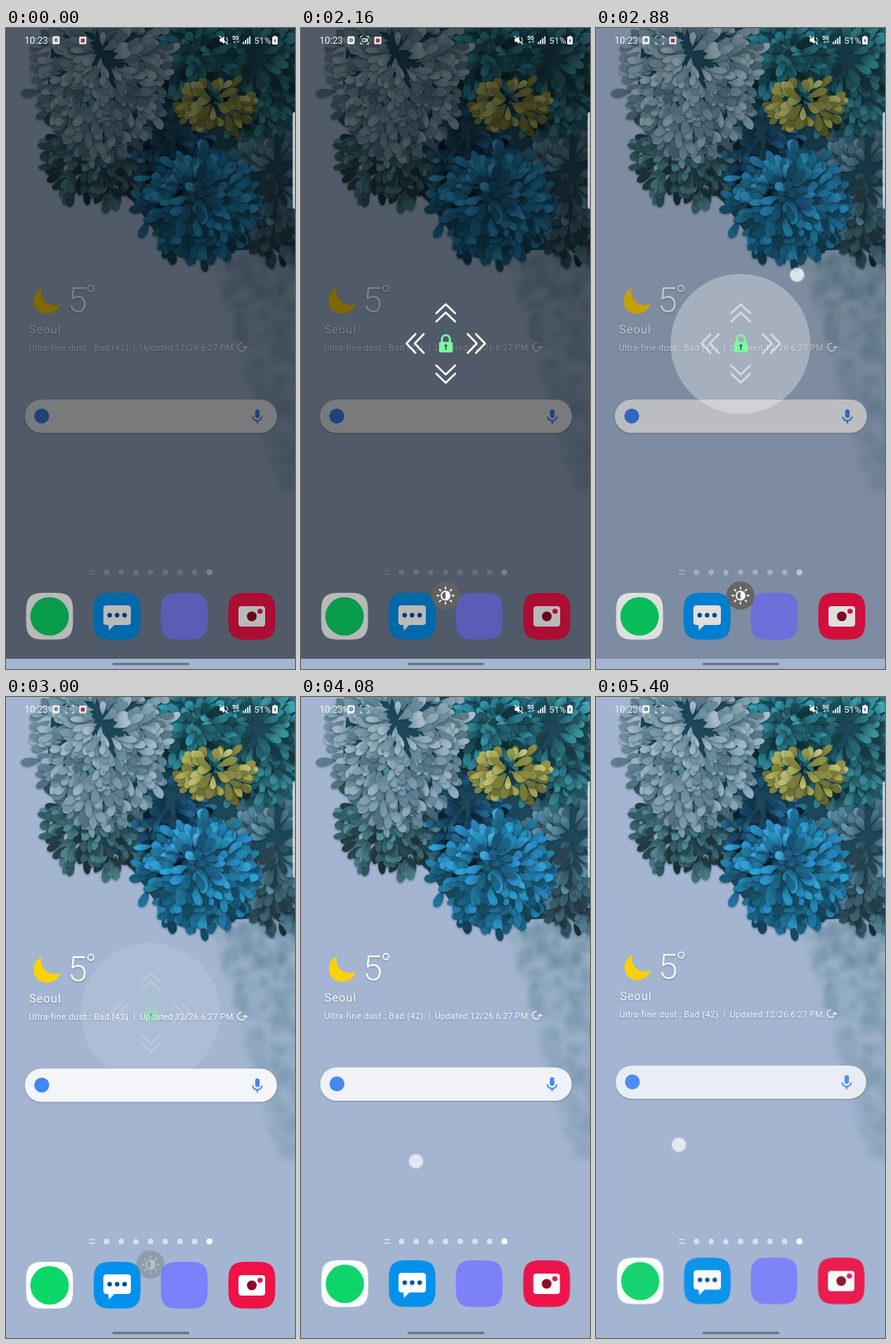
An HTML page with a canvas for the animation above (5520 ms loop, 368x816 px).

```html
<!DOCTYPE html>
<html lang="en">
<head>
<meta charset="utf-8">
<title>Screen dim and unlock</title>
<style>
html, body { margin: 0; width: 100%; height: 100%; overflow: hidden; background: #a3b5d1; }
canvas { display: block; width: 368px; height: 816px; }
</style>
</head>
<body>
<canvas id="stage" width="368" height="816"></canvas>
<script>
const W = 368, H = 816, LOOP = 5520, STEP = 120, PI = Math.PI, TAU = PI * 2;
const SKY = '#a3b5d1';
const FONT = 'Roboto, "Open Sans", sans-serif';
let g = document.getElementById('stage').getContext('2d');

// ---------- helpers ----------
function layer(draw) {
  const c = document.createElement('canvas');
  c.width = W;
  c.height = H;
  const saved = g;
  g = c.getContext('2d');
  draw();
  g = saved;
  return c;
}

function seeded(seed) {
  return () => {
    seed = (seed + 0x6D2B79F5) | 0;
    let n = Math.imul(seed ^ (seed >>> 15), 1 | seed);
    n = (n + Math.imul(n ^ (n >>> 7), 61 | n)) ^ n;
    return ((n ^ (n >>> 14)) >>> 0) / 4294967296;
  };
}

const clamp = (v, lo, hi) => Math.max(lo, Math.min(hi, v));
const ramp = (t, from, to) => clamp((t - from) / (to - from), 0, 1);

function disc(x, y, r, fill) {
  g.fillStyle = fill;
  g.beginPath();
  g.arc(x, y, r, 0, TAU);
  g.fill();
}

function box(x, y, w, h, r, fill) {
  g.fillStyle = fill;
  g.beginPath();
  g.roundRect(x, y, w, h, r);
  g.fill();
}

function pen(width, color, cap = 'round') {
  g.lineWidth = width;
  g.strokeStyle = color;
  g.lineCap = cap;
  g.lineJoin = 'round';
}

function arc(x, y, r, from, to) {
  g.beginPath();
  g.arc(x, y, r, from, to);
  g.stroke();
}

function line(...pts) {
  g.beginPath();
  for (let i = 0; i < pts.length; i += 2) g.lineTo(pts[i], pts[i + 1]);
  g.stroke();
}

function text(str, x, y, size, { weight = 400, gap = 0, color = '#fff', align = 'left' } = {}) {
  g.font = `${weight} ${size}px ${FONT}`;
  g.letterSpacing = gap + 'px';
  g.textAlign = align;
  g.fillStyle = color;
  g.fillText(str, x, y);
}

function shape(d, fill) {
  g.fillStyle = fill;
  g.fill(new Path2D(d));
}

// ---------- wallpaper ----------
function petal(x, y, dir, len, wid, base, tip) {
  g.save();
  g.translate(x, y);
  g.rotate(dir);
  const fill = g.createLinearGradient(0, 0, len, 0);
  fill.addColorStop(0, base);
  fill.addColorStop(.7, tip);
  g.fillStyle = fill;
  g.beginPath();
  g.moveTo(0, 0);
  g.bezierCurveTo(len * .4, -wid * .5, len * .9, -wid * .8, len, 0);
  g.bezierCurveTo(len * .9, wid * .6, len * .4, wid * .5, 0, 0);
  g.fill();
  g.restore();
}

// Loose flower head: petals are laid from the rim inwards, streaming away from the centre.
function bloom(cx, cy, rx, ry, hue, sat, light) {
  const rnd = seeded(cx * 7 + cy);
  const count = rx * ry / 13;
  g.save();
  g.shadowColor = 'rgba(0,30,50,.4)';
  g.shadowBlur = 3;
  g.shadowOffsetY = 1;
  for (let i = 0; i < count; i++) {
    const r = Math.sqrt(1 - i / count) * (.84 + rnd() * .3), a = rnd() * TAU;
    const x = cx + Math.cos(a) * rx * r, y = cy + Math.sin(a) * ry * r;
    const dir = Math.atan2(Math.sin(a) * r + .25, Math.cos(a) * r) + (rnd() - .5) * 1.5;
    const lit = rnd() - Math.sin(a) * r * .25;
    const tone = k => `hsl(${hue + rnd() * 8 - 4} ${sat}% ${light - 16 + k * 30}%)`;
    petal(x, y, dir, 15 + rnd() * 13, 8 + rnd() * 5, tone(lit * .4), tone(lit));
  }
  g.restore();
}

// Out-of-focus flowers, thinning out towards the lower right.
function haze() {
  const rnd = seeded(41);
  g.save();
  g.filter = 'blur(3px)';
  for (let i = 0; i < 420; i++) {
    const down = Math.pow(rnd(), 1.5);
    const left = 264 + 85 * down;
    g.globalAlpha = .4 * (1 - down * .85);
    g.fillStyle = `hsl(${196 + rnd() * 10} 24% ${44 + rnd() * 26}%)`;
    g.beginPath();
    g.ellipse(left + rnd() * (376 - left), 285 + down * 305, 9, 5, rnd() * PI, 0, TAU);
    g.fill();
  }
  g.restore();
}

const wallpaper = layer(() => {
  g.fillStyle = SKY;
  g.fillRect(0, 0, W, H);
  haze();
  shape('M60 0L50 110L90 180L150 205L190 260L245 285L368 280V0Z', 'hsl(198 52% 23%)');
  bloom(345, 205, 42, 84, 198, 30, 38);
  bloom(318, 50, 72, 75, 188, 48, 33);
  bloom(118, 155, 55, 56, 190, 30, 34);
  bloom(212, 150, 38, 72, 203, 62, 25);
  bloom(240, 45, 46, 48, 190, 55, 28);
  bloom(122, 55, 72, 98, 200, 21, 58);
  bloom(266, 98, 34, 24, 60, 36, 48);
  bloom(246, 225, 62, 58, 200, 66, 40);
});

// ---------- dock ----------
function tile(cx, fill) {
  const side = v => Math.sign(v) * Math.pow(Math.abs(v), .53) * 29.8;
  g.fillStyle = fill;
  g.beginPath();
  for (let a = 0; a < TAU; a += .04) g.lineTo(cx + side(Math.cos(a)), 748.8 + side(Math.sin(a)));
  g.fill();
}

const dock = layer(() => {
  tile(55.5, '#ffffff');
  disc(55.5, 749, 24.5, '#0bd768');

  tile(141.5, '#0091ec');
  box(124, 735, 35, 25, 4, '#fff');
  shape('M130 758H140L131 767Z', '#fff');
  for (const x of [132, 141.5, 151]) disc(x, 747.5, 2.9, '#064f9c');

  tile(227, '#7b80fb');

  tile(313, '#ee1246');
  box(296, 736, 34, 26, 4, '#fff');
  disc(313, 749, 6.2, '#8e0b24');
  disc(323.5, 742.5, 3.3, '#ee1246');
});

// ---------- home page ----------
function reload(x, y, r, flip = 1) {
  g.save();
  g.translate(x, y);
  g.scale(flip, 1);
  arc(0, 0, r, -PI / 2, PI);
  line(-r * 1.4, r * .2, -r, -r * .25, -r * .5, r * .2);
  g.restore();
}

function weather() {
  shape('M45.5 331C34 336 32 352 41 360C50 367 65 364 70 351C64 354 54 353 49 347C45 342 44 337 45.5 331Z', '#ffd200');
  g.save();
  g.shadowColor = 'rgba(40,60,90,.4)';
  g.shadowBlur = 2;
  g.shadowOffsetY = 1;
  text('5', 78.5, 362, 45, { weight: 300 });
  pen(1.6, '#fff');
  arc(108, 331.5, 3.8, 0, TAU);
  text('Seoul', 29.5, 389, 15, { gap: .7 });
  text('Ultra-fine dust : Bad (42)', 29, 411, 11, { gap: .33 });
  text('|', 162, 410, 11);
  text('Updated 12/26 6:27 PM', 170.5, 411, 11, { gap: .12 });
  pen(1.4, '#fff');
  reload(300, 406.5, 5, -1);
  g.restore();
}

function searchBar() {
  g.save();
  g.shadowColor = 'rgba(40,60,90,.35)';
  g.shadowBlur = 2;
  g.shadowOffsetY = 1;
  box(24, 473, 321, 42.5, 21.2, '#f3f5f9');
  g.restore();
  disc(45.5, 494, 9.5, '#4285f4');
  box(317.3, 485.5, 5.6, 11, 2.8, '#4285f4');
  pen(1.8, '#4285f4', 'butt');
  arc(320, 494, 6, .1, PI - .1);
  line(320, 500, 320, 503.5);
}

function card(x) {
  g.save();
  g.translate(x, 0);
  g.shadowColor = 'rgba(50,70,100,.4)';
  g.shadowBlur = 3;
  box(-12, 62, 83, 116, 10, '#fbfcfd');
  g.shadowColor = 'transparent';
  pen(2.6, '#111', 'butt');
  arc(29.5, 108.5, 20, -.35, 1.3);
  arc(29.5, 108.5, 20, 1.5, 5.7);
  pen(2.4, '#111');
  reload(29.5, 108.5, 10.5);
  text('OPTIMIZE', 29.7, 153, 11, { gap: .4, color: '#111', align: 'center' });
  g.restore();
}

function pageDots() {
  const soft = 'rgba(255,255,255,.58)';
  pen(1.5, soft, 'butt');
  line(105.5, 690.7, 113, 690.7);
  line(105.5, 695.3, 113, 695.3);
  for (let i = 0; i < 7; i++) {
    const x = 128 + i * 18.7;
    if (i === 2) shape(`M${x - 4} 693L${x} 689L${x + 4} 693H${x + 3}V696.5H${x - 3}V693Z`, soft);
    else disc(x, 693, 3.5, soft);
  }
  disc(259, 693, 3.8, '#fff');
}

function lifted(amount, draw) {
  const s = 1 - .006 * amount;
  g.save();
  g.translate(184, -170);
  g.scale(s, s);
  g.translate(-184, 170);
  g.globalAlpha = 1 - .07 * amount;
  draw();
  g.restore();
}

// ---------- system bars ----------
function statusBar(t) {
  const ink = '#f4f7fa', hole = '#4c596a';
  text('10:23', 23.5, 20, 12, { color: ink });
  box(59.3, 10.5, 9, 10, 1.5, ink);
  disc(63.8, 15.5, 2.4, hole);
  disc(63.8, 15.5, 1, ink);

  if (t >= STEP) {
    pen(1, ink, 'butt');
    for (const sx of [-1, 1]) for (const sy of [-1, 1]) {
      line(81 + sx * 5, 15.5 + sy * 2.5, 81 + sx * 5, 15.5 + sy * 5, 81 + sx * 2.5, 15.5 + sy * 5);
    }
    const blink = t % 1000;
    if (blink > 100 && blink < 390) {
      g.strokeRect(78.3, 13.5, 4, 4);
      line(82.3, 15.5, 84.5, 13.7, 84.5, 17.3, 82.3, 15.5);
    }
  }
  if (t < 3120) {
    box(93.3, 11, 9, 9.5, 1, ink);
    box(95.3, 13.5, 5, 5, 0, '#a8323a');
  }

  shape('M272 13.5H274.5L278 10.5V20.5L274.5 17.5H272Z', ink);
  pen(1.1, ink);
  line(272, 10.5, 282, 20.5);
  arc(277.5, 15.5, 4.5, -.8, .8);
  text('5G', 288, 15, 7, { weight: 700, color: ink });
  shape('M289 19L291 16.3L293 19ZM293.5 16.5H297.5L295.5 19.3Z', 'rgba(244,247,250,.6)');
  for (let i = 0; i < 4; i++) box(301.5 + i * 2.7, 17.5 - i * 2.3, 1.7, 3 + i * 2.3, 0, ink);
  text('51%', 316, 20, 11.5, { color: ink });
  box(341, 10, 3, 2, 0, ink);
  box(339, 11, 7, 10, 1, ink);
  shape('M343.5 12.5L340.8 16.5H342.4L341.6 19.5L344.3 15.5H342.7Z', hole);
}

function navBar() {
  g.fillStyle = SKY;
  g.fillRect(0, 803, W, 13);
  box(135.5, 808, 98, 3.2, 1.6, '#6c7888');
}

// ---------- lock screen ----------
function padlock(x, y) {
  const green = '#7ef9a2', hole = '#3f6d58';
  pen(2.6, green, 'butt');
  g.beginPath();
  g.moveTo(x - 5, y);
  g.arc(x, y - 5.5, 5, PI, 0);
  g.lineTo(x + 5, y);
  g.stroke();
  box(x - 8.7, y - 2, 17.4, 13.5, 2, green);
  disc(x, y + 2.8, 1.8, hole);
  box(x - .9, y + 3, 1.8, 5.5, 0, hole);
}

function brightness(x, y) {
  disc(x, y, 18, 'rgba(100,98,97,.92)');
  pen(1.8, '#fff');
  arc(x, y, 5.4, 0, TAU);
  g.fillStyle = '#fff';
  g.beginPath();
  g.arc(x, y, 5.4, -PI / 2, PI / 2);
  g.fill();
  for (let i = 0; i < 8; i++) {
    const c = Math.cos(i * TAU / 8), s = Math.sin(i * TAU / 8);
    line(x + c * 8.7, y + s * 8.7, x + c * 10.6, y + s * 10.6);
  }
}

const pull = t => ramp(t, 2280, 2880) ** 2;

function lockScreen(t) {
  const show = ramp(t, 1560, 1800) * (1 - ramp(t, 2880, 3060));
  if (!show) return;
  g.save();
  g.globalAlpha = show;
  disc(184, 402, 89 * pull(t), 'rgba(255,255,255,.3)');
  g.globalAlpha = show * (1 - .45 * pull(t));
  pen(2.5, '#fff');
  for (let i = 0; i < 4; i++) {
    g.save();
    g.translate(184.3, 401.7);
    g.rotate(i * PI / 2);
    for (const tip of [39.5, 50]) line(tip - 11.5, -12, tip, 0, tip - 11.5, 12);
    g.restore();
  }
  g.globalAlpha = show;
  padlock(184.5, 401.5);
  brightness(184, 722.5);
  g.restore();
}

// ---------- touch ----------
// Tap, unlocking pull, then swipes: up twice, sideways and back, up again.
function touchAt(t) {
  if (t >= 1440 && t < 1680) return [182, 560.5];
  if (t >= 2280 && t < 3000) return [184 + 72 * pull(t), 402 - 88 * pull(t)];
  if (t < 3480) return null;
  const sway = ramp(t, 4440, 5160), end = ramp(t, 5160, 5400);
  const hop = Math.sin(PI * ramp(t, 3480, 4440) * 2) ** 2;
  return [
    205 - 58.5 * Math.cos(TAU * sway) - 41 * (1 - (1 - end) ** 3),
    612 - 42 * (hop + end * end)
  ];
}

function touchDot([x, y]) {
  disc(x, y, 10, 'rgba(240,244,250,.35)');
  disc(x, y, 8.6, 'rgba(236,240,246,.8)');
}

// ---------- frame ----------
function paint(t) {
  const touch = touchAt(t);
  const dim = .5 * (1 - ramp(t, 2760, 2980));
  const free = t >= 3480;
  const lift = free ? clamp((603 - touch[1]) / 33, 0, 1.3) : 0;
  const shift = free ? Math.max(0, touch[0] - 152.5) : 0;

  g.drawImage(wallpaper, 0, 0);
  lifted(lift, () => {
    g.save();
    g.translate(shift, 0);
    weather();
    searchBar();
    g.restore();
    g.drawImage(dock, 0, 0);
  });
  if (shift) card(shift - 82);
  pageDots();

  if (dim) {
    g.fillStyle = `rgba(0,0,0,${dim})`;
    g.fillRect(0, 0, W, 803);
    g.globalAlpha = .45;
    g.drawImage(dock, 0, 0);
    g.globalAlpha = 1;
  }
  lockScreen(t);
  statusBar(t);
  box(365, 107, 8, 123.5, 3, 'rgba(226,232,240,.8)');
  navBar();
  if (touch) touchDot(touch);
}

const start = performance.now();
function tick() {
  const t = (performance.now() - start) % LOOP;
  paint(Math.floor(t / STEP) * STEP);
  requestAnimationFrame(tick);
}
tick();
</script>
</body>
</html>
```
